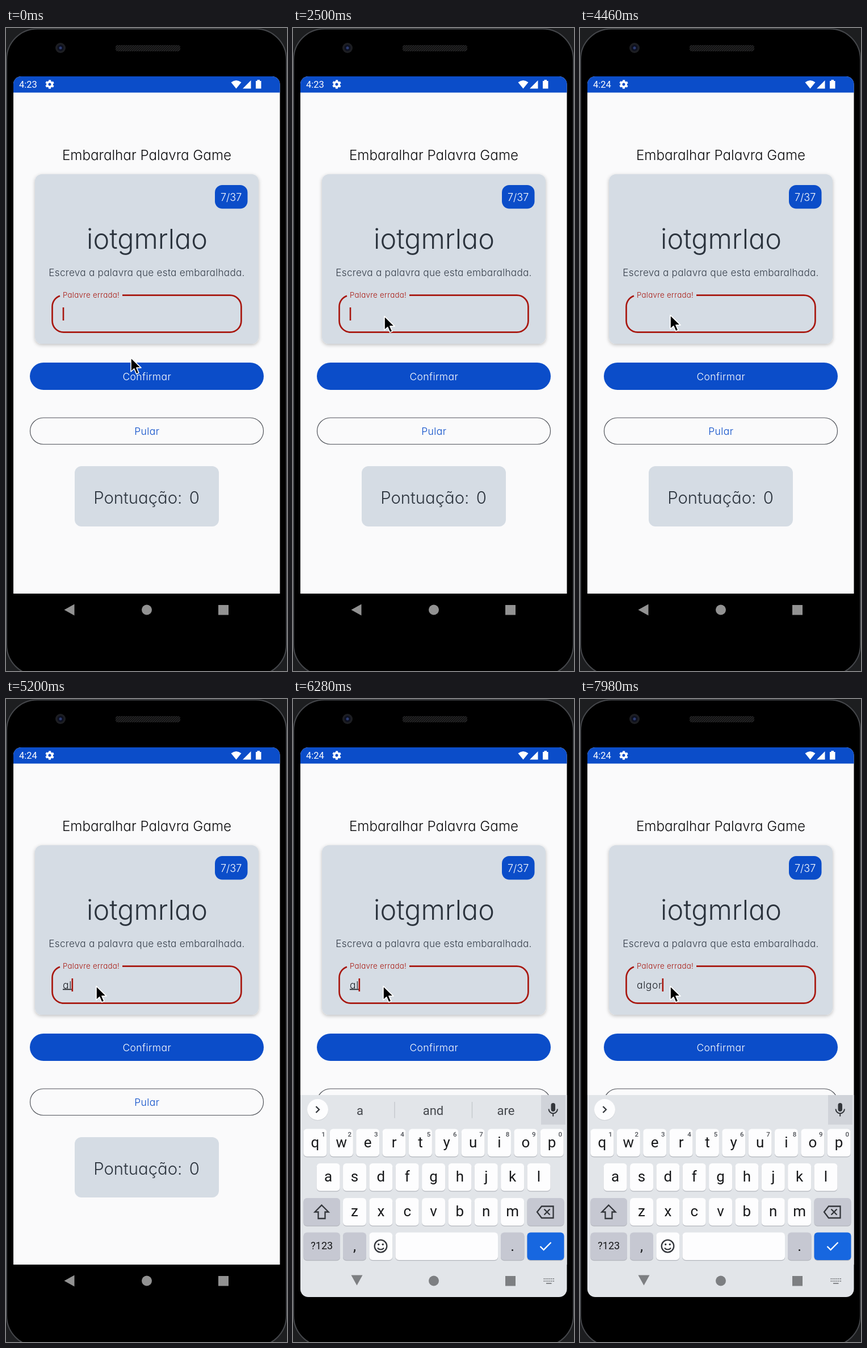
Write an HTML page that moves like this. It is 495 by 1130 pixels and loops after 8000 ms.

```html
<!DOCTYPE html>
<html lang="pt">
<head>
<meta charset="utf-8">
<title>Embaralhar Palavra</title>
<style>
  html, body { margin: 0; width: 100%; height: 100%; overflow: hidden; background: #000; }
  svg { display: block; width: 495px; height: 1130px; }
  .app { font-family: Inter, "Open Sans", sans-serif; font-weight: 300; font-feature-settings: "cv11"; }
  .sys { font-family: Roboto, sans-serif; }
  .mid { text-anchor: middle; }
  .line { fill: none; stroke: #33363b; stroke-width: 2.3; }
</style>
</head>
<body>
<svg viewBox="0 0 495 1130">
  <defs>
    <clipPath id="screen"><rect x="13" y="85" width="469.5" height="966" rx="14"/></clipPath>
    <filter id="soft" x="-10%" y="-10%" width="120%" height="120%">
      <feDropShadow dx="0" dy="2" stdDeviation="3.2" flood-color="#000" flood-opacity=".24"/>
    </filter>
    <pattern id="mesh" x="193" y="30" width="4" height="4" patternUnits="userSpaceOnUse">
      <rect width="4" height="4" fill="#111112"/>
      <path d="M0 4L4 0" stroke="#353535"/>
    </pattern>
  </defs>

  <!-- phone body -->
  <rect width="495" height="1130" fill="#1d1e20"/>
  <rect x="1" y="1.5" width="493" height="1136" rx="54" fill="#000" stroke="#45474b" stroke-width="2"/>
  <circle cx="96" cy="35" r="9" fill="#1d1e22"/>
  <circle cx="96" cy="35" r="5.5" fill="#0d1020"/>
  <circle cx="96" cy="35" r="2.5" fill="#2d3c70"/>
  <rect x="193" y="30" width="114" height="11" rx="4" fill="url(#mesh)"/>

  <!-- app -->
  <path d="M13 994V99a14 14 0 0 1 14-14H468.500a14 14 0 0 1 14 14V994z" fill="#fafafb"/>
  <path d="M13 113.500V99a14 14 0 0 1 14-14H468.500a14 14 0 0 1 14 14V113.500z" fill="#0b4dc9"/>
  <text id="clock" class="sys" x="23" y="105" font-size="16.500" fill="#fff"></text>
  <g transform="translate(77 99) rotate(30)" fill="none" stroke="#fff">
    <circle r="4.300" stroke-width="3.600"/>
    <circle r="6.600" stroke-width="2.400" stroke-dasharray="3.800 3.110" stroke-dashoffset="1.900"/>
  </g>
  <g fill="#fff">
    <path d="M396.500 95.500Q405.500 88.500 414.500 95.500L405.500 106.500z"/>
    <path d="M417 106.500L431.500 92V106.500z"/>
    <path d="M440 93h2.500v-2h4.500v2h2.500v13.500h-9.500z"/>
  </g>

  <g class="app mid">
    <text x="248" y="232" font-size="24.200" fill="#0c0c0e">Embaralhar Palavra Game</text>
    <rect x="51" y="257" width="394" height="298" rx="12" fill="#d5dce4" filter="url(#soft)"/>
    <rect x="368" y="276" width="57.500" height="41.500" rx="13" fill="#0b4dc9"/>
    <text x="396.700" y="303.500" font-size="18" fill="#fff">7/37</text>
    <text x="248.500" y="387.500" font-size="48.500" fill="#2c343e">iotgmrlao</text>
    <text x="248" y="436" font-size="17.200" letter-spacing=".25" fill="#363f4b">Escreva a palavra que esta embaralhada.</text>
    <path d="M205 469.700H394.400A20 20 0 0 1 414.400 489.700V514.700A20 20 0 0 1 394.400 534.700H101.500A20 20 0 0 1 81.500 514.700V489.700A20 20 0 0 1 95 470.800"
      fill="none" stroke="#a8170f" stroke-width="2.700"/>
    <text x="150" y="474" font-size="13.300" letter-spacing=".3" fill="#a8170f">Palavre errada!</text>
    <rect x="42" y="588" width="412" height="48" rx="24" fill="#0b4dc9"/>
    <text x="248.300" y="619" font-size="17.500" letter-spacing=".4" fill="#fff">Confirmar</text>
    <rect x="42.500" y="685" width="411" height="46.500" rx="23.200" fill="none" stroke="#50535a" stroke-width="1.200"/>
    <text x="248.300" y="715" font-size="17.500" letter-spacing=".4" fill="#0b4dc9">Pular</text>
    <rect x="121" y="770" width="254" height="106" rx="12" fill="#d5dce4"/>
    <text x="247.500" y="835.500" font-size="29.300" word-spacing="4" fill="#2c343e">Pontuação: 0</text>
  </g>
  <text id="typed" class="app" x="100" y="508.500" font-size="17.500" letter-spacing=".6" fill="#1c2026"></text>
  <rect id="caret" y="491" width="2.600" height="23" fill="#a8170f"/>

  <!-- keyboard -->
  <g clip-path="url(#screen)"><g id="board" class="sys mid"></g></g>

  <!-- navigation -->
  <g id="nav">
    <path id="back" d="M-10 0L8 -10V10z"/>
    <circle cx="248" cy="1022.500" r="9"/>
    <rect x="374" y="1014" width="18" height="17.500"/>
    <g id="switcher" fill="none" stroke="#85878b" stroke-width="2">
      <path d="M441.500 1019H460M441.500 1023H460" stroke-dasharray="2 1.300"/>
      <path d="M446 1027H455.500"/>
    </g>
  </g>

  <path id="mouse" d="M0 0V24.500L5.700 19.300L9.700 28.500L14 26.600L10 17.600H18z"
    fill="#000" stroke="#fff" stroke-width="1.600" stroke-linejoin="round"/>
</svg>

<script>
const LOOP = 8000, PITCH = 46.35;
const $ = id => document.getElementById(id);

// Keyboard, built at its resting place
function key(x, y, w, label = '', fill = '#fdfdfe', size = 26) {
  return `<rect x="${x}" y="${y + 1.3}" width="${w}" height="48.500" rx="6" fill="#b3b6bd"/>
    <rect x="${x}" y="${y}" width="${w}" height="48.500" rx="6" fill="${fill}"/>
    <text x="${x + w / 2}" y="${y + 24.5 + size * .3}" font-size="${size}" fill="#17181a">${label}</text>`;
}

function letters(text, x, y) {
  return [...text].map((c, i) => key(x + i * PITCH, y, 41, c)).join('');
}

const GREY = '#c6c8d2';
const digits = [...'1234567890'].map((d, i) =>
  `<text x="${53.5 + i * PITCH}" y="769" font-size="11.500" font-weight="500" fill="#4b4e54">${d}</text>`).join('');
const words = ['a', 'and', 'are'].map((w, i) =>
  `<text x="${[118, 247, 375][i]}" y="730.500" font-size="22" fill="#45484d">${w}</text>`).join('');

$('board').innerHTML = `
  <rect x="13" y="696" width="470" height="356" fill="#e2e5e9"/>
  <rect id="micBox" x="437" y="696" width="43" height="52" fill="#d0d3d9"/>
  <circle cx="43.500" cy="722.300" r="18.500" fill="#c9ccd1"/>
  <circle cx="43.500" cy="721.500" r="18.500" fill="#fdfdfe"/>
  <path class="line" d="M40.500 716L46 721.500L40.500 727"/>
  <g id="hints">${words}<path d="M179 708V736.500M315.500 708V736.500" stroke="#c3c6cb" stroke-width="1.300"/></g>
  <rect x="454.500" y="710" width="7.500" height="15" rx="3.700" fill="#33363b"/>
  <path class="line" d="M450.500 720.500a7.700 7.700 0 0 0 15.400 0M458.200 728V733.500" style="stroke-width:2"/>
  ${letters('qwertyuiop', 18.5, 755.5)}${digits}
  ${letters('asdfghjkl', 41.7, 816)}
  ${key(18.5, 877, 64.5, '', GREY)}${letters('zxcvbnm', 88, 877)}${key(412.5, 877, 65, '', GREY)}
  ${key(18.5, 937.5, 64.5, '?123', GREY, 18)}${key(88, 937.5, 41, ',', GREY)}
  ${key(134.3, 937.5, 41)}${key(180.5, 937.5, 180.5)}
  ${key(366, 937.5, 41.5, '.', GREY)}${key(412.5, 937.5, 65, '', '#1767e0')}
  <path class="line" d="M50.500 889.500L62.500 901.500H56.500V913H44.500V901.500H38.500z"/>
  <path class="line" d="M430 901.500L438 891.500H458.500V912H438zM442.500 896.500L452.500 906.500M452.500 896.500L442.500 906.500"/>
  <circle class="line" cx="154.500" cy="961.500" r="10.800"/>
  <path class="line" d="M149 964.500a6 5 0 0 0 11 0" style="stroke-width:2"/>
  <circle cx="150.700" cy="958.500" r="1.700" fill="#33363b"/>
  <circle cx="158.300" cy="958.500" r="1.700" fill="#33363b"/>
  <path class="line" d="M435.500 962L441.500 968L454.500 955" style="stroke:#fff"/>`;

// Steps: [time, value]
const typing = [[0, ''], [4860, 'a'], [5160, 'al'], [6850, 'alg'], [7200, 'algo'], [7600, 'algor']];
const clicks = [1200, 3900];
const blinkStarts = [...typing.map(s => s[0]), ...clicks].sort((a, b) => a - b);
const path = [[0, 220, 579.5], [640, 168, 517], [720, 167.5, 515.5], [1200, 161, 506.5], [3600, 161, 506.5], [3860, 159, 504.5], [LOOP, 159, 504.5]];
const SLIDE = { start: 5260, length: 300 };

const clamp = v => Math.min(1, Math.max(0, v));
const smooth = p => p * p * (3 - 2 * p);

function pointer(t) {
  const i = path.findIndex(p => p[0] > t);
  const [t0, x0, y0] = path[i - 1], [t1, x1, y1] = path[i];
  const p = smooth((t - t0) / (t1 - t0));
  return [x0 + (x1 - x0) * p, y0 + (y1 - y0) * p];
}

function draw(t) {
  $('clock').textContent = t < 3400 ? '4:23' : '4:24';

  const text = typing.filter(s => s[0] <= t).pop()[1];
  const field = $('typed');
  if (field.textContent !== text) field.textContent = text;
  field.style.textDecoration = text.length < 3 ? 'underline' : 'none';
  $('caret').setAttribute('x', 99.7 + (text ? field.getComputedTextLength() : 0));
  const blink = blinkStarts.filter(s => s <= t).pop();
  $('caret').style.opacity = (t - blink) % 1000 < 500 ? 1 : 0;

  const p = clamp((t - SLIDE.start) / SLIDE.length);
  $('board').setAttribute('transform', `translate(0 ${355 * (1 - p) ** 3})`);
  $('board').style.display = p > 0 ? '' : 'none';
  $('micBox').style.opacity = p < 1 ? 0 : 1;
  $('hints').style.opacity = text.length < 3 ? 1 : 0;

  $('nav').setAttribute('fill', p > 0 ? '#7d7f82' : '#929292');
  $('back').setAttribute('transform', `translate(112.500 ${1022.5 - 2 * p}) rotate(${-90 * p})`);
  $('switcher').style.opacity = clamp(p * 2);

  $('mouse').setAttribute('transform', `translate(${pointer(t)})`);
}

const begin = performance.now();
function tick() {
  draw((performance.now() - begin) % LOOP);
  requestAnimationFrame(tick);
}
tick();
</script>
</body>
</html>
```
